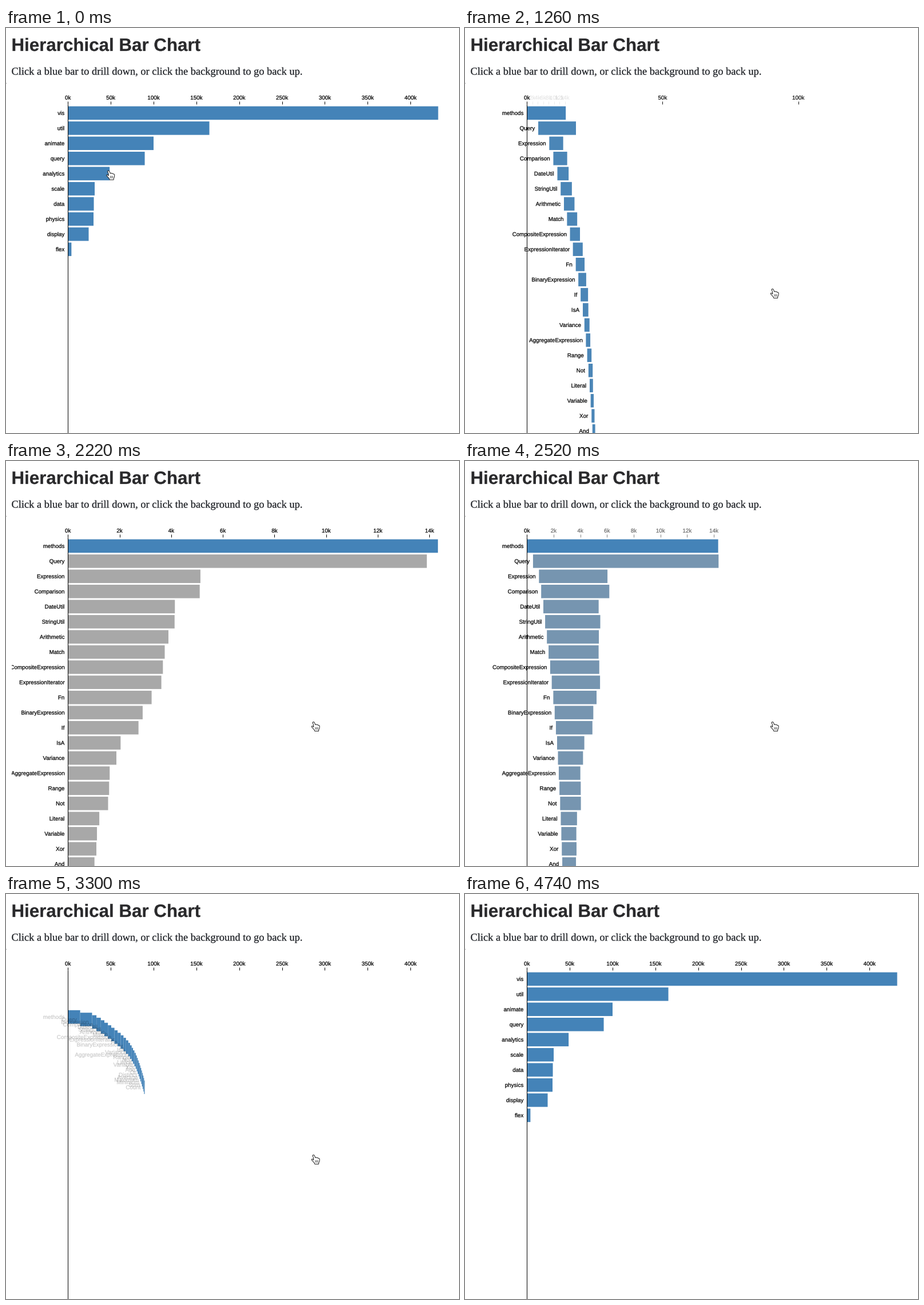
A matplotlib script that plays this animation: 792 px wide and 707 px high, repeating every 4.8 s.

```python
import numpy as np
import matplotlib.pyplot as plt
from matplotlib.animation import FuncAnimation
from matplotlib.patches import Polygon, Rectangle
from matplotlib.patheffects import Stroke

W, H, DPI = 792, 707, 100
FRAMES, INTERVAL = 80, 60
PX = 72 / DPI                       # points per pixel

X0, SPAN = 108.2, 647.4             # chart origin and plot width
TOP, STEP, BAR = 136.7, 26.43, 23.5
BLUE, GREY = np.array([68, 131, 184]) / 255, np.array([168, 168, 168]) / 255

PARENTS = [("vis", 432.3), ("util", 165.16), ("animate", 100.02),
           ("query", 89.72), ("analytics", 48.72), ("scale", 31.29),
           ("data", 30.28), ("physics", 29.93), ("display", 24.25),
           ("flex", 4.12)]
CHILDREN = [("methods", 14.326), ("Query", 13.896), ("Expression", 5.130),
            ("Comparison", 5.103), ("DateUtil", 4.141), ("StringUtil", 4.130),
            ("Arithmetic", 3.891), ("Match", 3.748),
            ("CompositeExpression", 3.677), ("ExpressionIterator", 3.617),
            ("Fn", 3.240), ("BinaryExpression", 2.893), ("If", 2.732),
            ("IsA", 2.039), ("Variance", 1.876),
            ("AggregateExpression", 1.616), ("Range", 1.594), ("Not", 1.554),
            ("Literal", 1.214), ("Variable", 1.124), ("Xor", 1.101),
            ("And", 1.027), ("Or", 0.970), ("Distinct", 0.933),
            ("Average", 0.891), ("Maximum", 0.843), ("Minimum", 0.843),
            ("Sum", 0.791), ("Count", 0.781)]
OPENED = 3                          # row of the bar that is drilled into
K_PARENT, K_CHILD = SPAN / PARENTS[0][1], SPAN / CHILDREN[0][1]
OFFSETS = np.cumsum([0] + [v for _, v in CHILDREN])

DOWN, DOWN_LEN = 429, 657           # drill down: start and stage length, ms
UP, UP_LEN = 2182, 676              # back up
UP_END = UP + 2 * UP_LEN
CURSOR_GONE = 4560

plt.rcParams["text.hinting"] = "none"
fig = plt.figure(figsize=((W + 1e-6) / DPI, (H + 1e-6) / DPI), dpi=DPI,
                 facecolor="white")
ax = fig.add_axes([0, 0, 1, 1])
ax.set_xlim(0, W)
ax.set_ylim(H, 0)
ax.axis("off")


def ease(start, length, t):
    u = min(max((t - start) / length, 0), 1)
    return 4 * u ** 3 if u < 0.5 else 1 - 4 * (1 - u) ** 3


def lerp(a, b, u):
    return a + (b - a) * u


def label(x, y, s, size, z, stroke=0.25, **kw):
    kw = {"family": "Liberation Sans", "color": "black", **kw}
    # a hairline outline gives soft, slightly heavier glyphs
    outline = Stroke(linewidth=stroke * PX, foreground=kw["color"])
    return ax.text(x, y, s, fontsize=size * PX, va="baseline", zorder=z,
                   clip_on=True, path_effects=[outline], **kw)


def line(xs, ys, z, width=1, color="black", **kw):
    return ax.plot(xs, ys, color=color, lw=width * PX, zorder=z, **kw)[0]


def make_bars(rows, z):
    bars = []
    for name, _ in rows:
        rect = Rectangle((X0, 0), 1, BAR, lw=0, fc=BLUE, zorder=z, snap=False)
        ax.add_patch(rect)
        bars.append((rect, label(0, 0, name, 9.8, z, ha="right")))
    return bars


def place(bar, x, row, width):
    rect, text = bar
    y = TOP + STEP * row
    rect.set_bounds(x, y, width, BAR)
    text.set_position((x - 6, y + BAR / 2 + 3.4))


def make_ticks(values):
    return [(v, line([X0, X0], [128, 133.5], 3, solid_capstyle="butt"),
             label(X0, 124.9, f"{v}k", 9.8, 3, ha="center")) for v in values]


def update_ticks(ticks, k, alpha):
    for v, mark, text in ticks:
        x = X0 + v * k
        mark.set_xdata([x, x])
        text.set_x(x)
        for part in (mark, text):
            part.set_alpha(alpha)
            part.set_visible(alpha > 0.002 and x < W + 20)


# Fixed parts
label(9.5, 40, "Hierarchical Bar Chart", 31.3, 6, weight="bold",
      color="#29292b")
label(9.5, 81.5,
      "Click a blue bar to drill down, or click the background to go back up.",
      18.4, 6, family="Liberation Serif", color="#1b1e23")
line([X0, X0], [133, H + 2], 3, solid_capstyle="butt")
ax.add_patch(Rectangle((0, 100), 10, H - 100, fc="white", lw=0, zorder=4))
ax.add_patch(Rectangle((0, 96), 1, 1, fc="#888888", lw=0, zorder=4))

parents = make_bars(PARENTS, 1)
children = make_bars(CHILDREN, 2)
for i, (bar, (_, v)) in enumerate(zip(parents, PARENTS)):
    place(bar, X0, i, v * K_PARENT)
make_ticks([0])
coarse = make_ticks(range(50, 401, 50))
fine = make_ticks(range(2, 15, 2))

# Cursors, relative to their hot spot
HAND = np.array([(-2, .5), (-1, -.5), (.8, -.2), (1.8, 1.8), (2.8, 4.4),
                 (4.2, 3.7), (5.6, 4.6), (7, 4.3), (8, 5.4), (9.4, 5.5),
                 (10.3, 7), (10, 10.5), (8.8, 13), (8.6, 15.5), (1.8, 15.5),
                 (1, 13.5), (-1.5, 10.5), (-3.6, 8.2), (-3.4, 6.8),
                 (-1.6, 6.8), (-.2, 8.4), (-.4, 5)])
hand = Polygon(HAND, fc="white", ec="#222222", lw=PX, zorder=5,
               joinstyle="round")
ax.add_patch(hand)
KNUCKLES = (3, 5, 7)
knuckles = [line([0, 0], [0, 1], 5, 0.8, "#333333", snap=False)
            for _ in KNUCKLES]
BEAM_X = np.array([-3.5, -1, 0, 1, 3.5, np.nan, 0, 0, np.nan,
                   -3.5, -1, 0, 1, 3.5, np.nan, -2, 2])
BEAM_Y = np.array([-7.5, -7.2, -6, -7.2, -7.5, np.nan, -6, 6, np.nan,
                   7.5, 7.2, 6, 7.2, 7.5, np.nan, 2, 2])
beams = [line(BEAM_X, BEAM_Y, 5, 3, "white"), line(BEAM_X, BEAM_Y, 5, 1.2)]


def update_cursor(t):
    start, bar, rest = np.array([(179.5, 249.5), (189.5, 227), (538, 456)])
    pos = lerp(start, bar, ease(0, 380, t))
    pos = lerp(pos, rest, ease(760, 440, t))
    shown = t < CURSOR_GONE
    typing = DOWN < t < 790
    hand.set_xy(HAND + pos)
    hand.set_visible(shown and not typing)
    for dx, k in zip(KNUCKLES, knuckles):
        k.set_data([pos[0] + dx] * 2, [pos[1] + 9, pos[1] + 12.5])
        k.set_visible(shown and not typing)
    for b in beams:
        b.set_data(BEAM_X + pos[0], BEAM_Y + pos[1])
        b.set_visible(typing)


def update(n):
    t = n * INTERVAL
    # spread: stacked row to staircase; settle: staircase to own scale
    spread = ease(DOWN, DOWN_LEN, t) - ease(UP + UP_LEN, UP_LEN, t)
    settle = ease(DOWN + DOWN_LEN, DOWN_LEN, t) - ease(UP, UP_LEN, t)
    k = lerp(K_PARENT, K_CHILD, settle)
    open_now = DOWN <= t < UP_END

    fade = 1 - ease(DOWN, DOWN_LEN, t) + ease(UP_END, UP_LEN, t)
    for i, (rect, text) in enumerate(parents):
        rect.set_alpha(1 if i == OPENED else fade)
        text.set_alpha(fade)
        text.set_visible(fade > 0)
    parents[OPENED][0].set_visible(not open_now)

    for i, bar in enumerate(children):
        rect, text = bar
        value = CHILDREN[i][1]
        place(bar, X0 + OFFSETS[i] * K_PARENT * (1 - settle),
              lerp(OPENED, i, spread), value * k)
        if i:                       # only the first one can be opened
            rect.set_facecolor(lerp(BLUE, GREY, settle))
        rect.set_visible(open_now)
        text.set_visible(open_now)
        text.set_alpha(spread)

    update_ticks(coarse, k, 1 - settle)
    update_ticks(fine, k, settle)
    update_cursor(t)
    return []


anim = FuncAnimation(fig, update, frames=FRAMES, interval=INTERVAL,
                     init_func=lambda: update(0), repeat=True, repeat_delay=0,
                     cache_frame_data=False)
plt.show()
```
